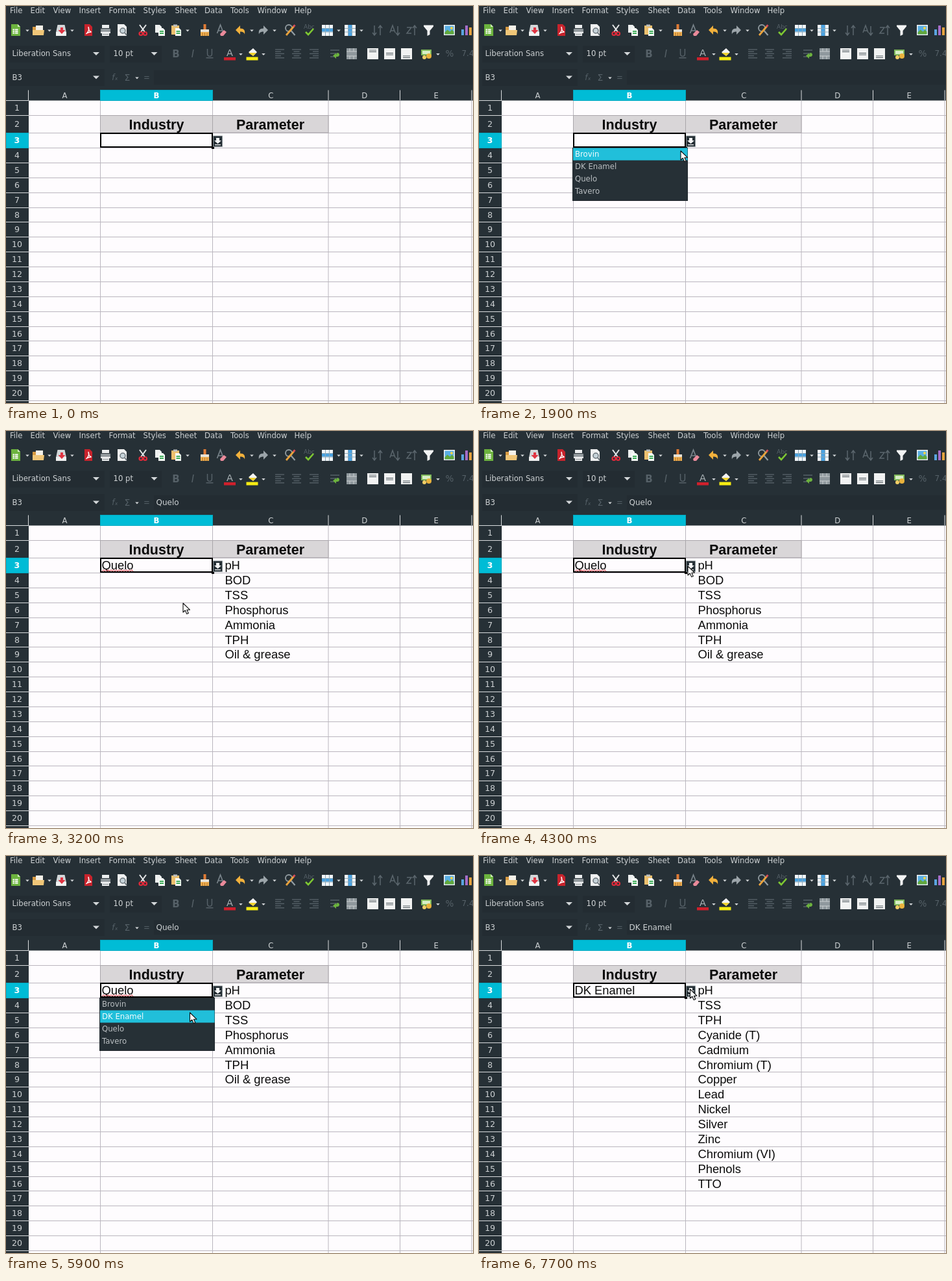
An HTML page that plays this animation: 720x611 px, repeating every 8 s.

```html
<!DOCTYPE html>
<html lang="en">
<head>
<meta charset="utf-8">
<title>Dependent drop-down list</title>
<style>
html, body { margin: 0; width: 100%; height: 100%; overflow: hidden; background: #263036; }
svg { display: block; width: 720px; height: 611px; }
text { font: 11.7px "DejaVu Sans", sans-serif; fill: #cdd1d3; white-space: pre; }
.mid { text-anchor: middle; }
.num { font-size: 12.6px; }
.on { fill: #fff; font-weight: bold; }
.dim { fill: #566168; }
.bar { font-size: 12px; }
.cell { font: 18.4px "Liberation Sans", Arial, sans-serif; fill: #0a0a0a; }
.head { font: bold 21.5px "Liberation Sans", Arial, sans-serif; fill: #0a0a0a; text-anchor: middle; }
.item { fill: #b9bec1; }
.item.hot { fill: #f2fbfd; }
</style>
</head>
<body>
<svg id="stage" viewBox="0 0 720 611">
  <rect width="720" height="611" fill="#263036"/>
  <g id="menu"></g>

  <!-- standard toolbar -->
  <g id="icons">
    <path d="M8 28h10l4 4v14H8z" fill="#6cb33e"/>
    <path d="M10 35h9v8h-9zM10 37.7h9M10 40.3h9M13.500 35v8" fill="#fff" stroke="#6cb33e" stroke-width=".8"/>
    <path d="M18 28v4h4z" fill="#d5efc2"/>
    <path d="M41 32h6l2 2h8v11H41z" fill="#d79a42"/>
    <path d="M46 30h11v7H46z" fill="#f4f1e8"/>
    <path d="M41 37h18l-1 8H41z" fill="#f0c678"/>
    <path d="M79.500 29h11l2.500 12H77z" fill="#d3d7d9"/>
    <path d="M77 40h16v6H77z" fill="#f1f2f2"/>
    <path d="M84 33h4v4h3.500l-5.500 6-5.500-6H84z" fill="#e03442"/>
    <path d="M121 28h8l4 4v14h-12z" fill="#c8232c"/>
    <path d="M123.500 43c4-3 5-8 3.500-11 0 5 2 7 4.500 8-3 0-6 1-8 3z" fill="none" stroke="#fff" stroke-width="1.300"/>
    <path d="M148 29h11v5h-11zM146 36h15v6h-15zM148 42h11v4h-11z" fill="#eceeef"/>
    <path d="M146 35h15v4h-15zM149 43.500h9" fill="#9ba2a6" stroke="#555e64" stroke-width=".7"/>
    <path d="M172 28h10l4 4v14h-14z" fill="#f0f1f1"/>
    <circle cx="180" cy="38" r="4" fill="#c7d3d9" stroke="#6a747a" stroke-width="1.500"/>
    <path d="M183 41l3 4" stroke="#6a747a" stroke-width="2"/>
    <path d="M206 29l8 11M216 29l-8 11" stroke="#e4e6e7" stroke-width="2"/>
    <g fill="none" stroke="#e02a3a" stroke-width="2.200"><circle cx="208" cy="42.500" r="2.500"/><circle cx="214.500" cy="42.500" r="2.500"/></g>
    <path d="M230 29h7l3 3v9h-10z" fill="#eef0f0"/>
    <path d="M235 34h7l3 3v9h-10z" fill="#f7f9f7"/>
    <path d="M237 39h6M237 42h6" stroke="#3fae5a" stroke-width="2"/>
    <path d="M255 30h12v14h-12z" fill="#edc06e"/>
    <path d="M258 28.500h6v3h-6z" fill="#b8bdc0"/>
    <path d="M261 34h6l3 3v9h-9z" fill="#f7f9f7"/>
    <path d="M262.500 39h6M262.500 42h6" stroke="#3fae5a" stroke-width="2"/>
    <path d="M304.500 28h4v8h-4z" fill="#e07b35"/>
    <path d="M300 36h13v4h-13z" fill="#e7e2d6"/>
    <path d="M300 40h13v6h-13z" fill="#efb052"/>
    <path d="M303 41v5M306.500 41v5M310 41v5" stroke="#b06f24"/>
    <path d="M325.500 42l5-13 5 13M327.500 38h6" fill="none" stroke="#78838a" stroke-width="1.700"/>
    <path d="M330 43l6-6 4 3-5 6h-4z" fill="#ea8a9a"/>
    <path d="M354 37l7-7v4.500c6 0 8 3 7 9-1-3-3-4-7-4v4.500z" fill="#f2b13c"/>
    <path d="M404 37l-7-7v4.500c-6 0-8 3-7 9 1-3 3-4 7-4v4.500z" fill="#9ca5aa"/>
    <circle cx="436" cy="34" r="5" fill="none" stroke="#929ca1" stroke-width="1.800"/>
    <path d="M439.500 38l6 7" stroke="#929ca1" stroke-width="2.200"/>
    <path d="M432 45l12-14" stroke="#e9a23b" stroke-width="2.800"/>
    <path d="M443 32l2.500-2.800" stroke="#d94c59" stroke-width="2.800"/>
    <text class="dim" x="459" y="35" style="font-size:9px">Abc</text>
    <path d="M462 40l4 4 8-9" fill="none" stroke="#7ec832" stroke-width="2.600"/>
    <g id="tables"></g>
    <g fill="none" stroke="#5b666d" stroke-width="1.500">
      <path d="M568 30v14M565 41l3 4 3-4M577 45V30M574 34l3-4 3 4"/>
      <path d="M592 41l4-11 4 11M593.500 38h5M604 31v13M601 41l3 4 3-4"/>
      <path d="M618 33h7l-7 9h7M630 45V30M627 34l3-4 3 4"/>
    </g>
    <path d="M644 29.500h15v2l-5.500 6.500v6l-4 2v-8l-5.500-6.500z" fill="#f3f4f4"/>
    <path d="M675 29h17v16h-17z" fill="#f4f4f4"/>
    <path d="M676.500 30.500h14v13h-14z" fill="#5aaee3"/>
    <path d="M676.500 43.500v-3l4-4 4 3 3-3 3 3v4z" fill="#61a83c"/>
    <circle cx="687" cy="34" r="2" fill="#f7d54a"/>
    <path d="M702 36h4v9h-4z" fill="#5aa4e0"/>
    <path d="M708 30h4v15h-4z" fill="#a56cc8"/>
    <path d="M714 33h4v12h-4z" fill="#e8a33d"/>
  </g>

  <!-- formatting toolbar -->
  <g fill="#232c32"><path d="M5 61h147v26H5zM160 61h80v26h-80zM5 97h147v26H5zM228 99h492v22H228z"/></g>
  <text x="9.500" y="77">Liberation Sans</text>
  <text x="165.500" y="77">10 pt</text>
  <text x="9.500" y="114">B3</text>
  <g class="mid">
    <text class="dim" x="262" y="79" style="font-size:15px;font-weight:bold">B</text>
    <text class="dim" x="288" y="79" style="font-size:15px;font-style:italic">I</text>
    <text class="dim" x="314" y="78" style="font-size:15px;text-decoration:underline">U</text>
    <text x="345" y="77" style="font-size:14.500px;fill:#aab2b6">A</text>
    <text class="dim" x="684" y="78" style="font-size:13.500px">%</text>
    <text class="dim" x="712" y="77" style="font-size:12px">7.4</text>
    <text class="dim" x="168" y="114" style="font-style:italic">fₓ</text>
    <text class="dim" x="187" y="115" style="font-size:14px">Σ</text>
    <text class="dim" x="217" y="114">=</text>
  </g>
  <path d="M336 79h18v4.500h-18z" fill="#d0202c"/>
  <path d="M370.500 78.500h18v5h-18z" fill="#f7ec13"/>
  <path d="M374 71l7-6 6 6-6 6z" fill="#f3f3f3"/>
  <path d="M374 72h12l-5 5z" fill="#f0d22e"/>
  <g id="aligns" stroke="#566168" stroke-width="1.400"></g>
  <path d="M500 68h14M500 73h11M500 78h6" stroke="#566168" stroke-width="1.500"/>
  <path d="M511 72c4 0 4 6 0 6h-2v3l-5-4.500 5-4v2.500" fill="#6cb33e"/>
  <path d="M525 65h16v17h-16z" fill="#8f989d"/>
  <path d="M525 70h16M525 77h16M530 65v5M536 65v5M530 77v5M536 77v5" stroke="#c9ced0"/>
  <g id="valigns"></g>
  <path d="M640 67h16v9h-16z" fill="#7fb95a"/>
  <path d="M642 69h12v5h-12z" fill="#d9efc8"/>
  <circle cx="652" cy="77" r="4" fill="#e9b23c"/><circle cx="645" cy="79" r="3" fill="#f2cf66"/>
  <g id="tris"></g>

  <!-- sheet -->
  <rect x="35" y="145.500" width="685" height="466" fill="#fefcfe"/>
  <g id="grid"></g>
  <g fill="#00bcd6" stroke="#00a9c1">
    <rect x="145.500" y="129.500" width="173" height="16"/>
    <rect x=".5" y="195.500" width="34" height="23"/>
  </g>
  <text class="mid on" x="232" y="141.500">B</text>
  <text class="mid num on" x="17" y="211.400">3</text>
  <rect x="145.500" y="168.500" width="351.500" height="26.500" fill="#d9d6d8" stroke="#a9a5aa"/>
  <path d="M318.500 168v27" stroke="#a9a5aa"/>
  <text class="head" x="232" y="189.500">Industry</text>
  <text class="head" x="407.500" y="189.500">Parameter</text>
  <g id="params"></g>
  <rect x="146" y="196" width="172" height="21" fill="#fefcfe" stroke="#000" stroke-width="2"/>
  <path d="M317 216h4v4h-4z" fill="#000"/>
  <text id="value" class="cell" x="147.400" y="213.200"></text>
  <path id="wave" fill="none" stroke="#e0303a" stroke-width="1"/>
  <text id="formula" class="bar" x="231.500" y="113.500"></text>
  <rect x="319.500" y="200" width="14" height="16.500" fill="#263036" stroke="#8b9498" stroke-width=".8"/>
  <path d="M324 203h5v4h3l-5.500 5-5.500-5h3zM322 213h9v1.300h-9z" fill="#f4f5f5"/>
  <g id="list">
    <rect x="144.500" y="218.500" width="177" height="81" fill="#263036" stroke="#1f272c"/>
    <rect id="hot" x="145" width="176.500" height="19" fill="#21bfda"/>
    <rect id="focus" x="147.500" y="220" width="173" height="16" fill="none" stroke="#7d878c" stroke-width=".8"/>
    <g id="items"></g>
  </g>
  <path id="mouse" d="M0 0v14l3.300-3 2.400 5.600 2.600-1.100-2.400-5.300h4.500z" fill="#fff" stroke="#0c0c0c" stroke-width="1.100" stroke-linejoin="round"/>
</svg>
<script>
const $ = id => document.getElementById(id);
const put = (id, html) => { $(id).innerHTML = html; };
const label = (x, y, s, cls = "") => `<text class="${cls}" x="${x}" y="${y}">${s}</text>`;
const line = (d, color) => `<path d="${d}" stroke="${color}" fill="none"/>`;

// toolbar parts
const menus = { File: 6, Edit: 37.5, View: 72.5, Insert: 112.5, Format: 158.5, Styles: 211.5,
  Sheet: 260.5, Data: 306, Tools: 346, Window: 387.5, Help: 444.5 };
put("menu", Object.entries(menus).map(([s, x]) => label(x, 11, s)).join(""));

const tri = (x, y, r) => `<path d="M${x - r} ${y - r / 2}h${2 * r}l${-r} ${r}z" fill="#d3d7d9"/>`;
put("tris",
  [33, 67, 102, 280, 379, 414, 513, 548].map(x => tri(x, 38, 2.8)).join("") +
  [362, 397, 666].map(x => tri(x, 74.5, 2.8)).join("") + tri(202, 111, 2.8) +
  tri(139, 73.5, 5) + tri(228.5, 73.5, 5) + tri(139, 110, 5));

put("tables", [487, 522].map((x, i) =>
  `<path d="M${x} 29h17v17h-17z" fill="#f3f6f8"/>` +
  `<path d="${i ? `M${x + 6} 29h5v17h-5z` : `M${x} 34.500h17v5h-17z`}" fill="#4aa3e2"/>` +
  line(`M${x} 34.500h17m-17 5.500h17M${x + 5.5} 29v17m6-17v17`, "#8aa7b8")).join(""));

put("aligns", [415, 441, 468].map((x, k) => [0, 1, 2, 3, 4].map(i => {
  const w = i % 2 ? 9 : 14;
  return `<path d="M${x + (14 - w) * k / 2} ${67 + i * 3.2}h${w}"/>`;
}).join("")).join(""));

put("valigns", [557, 583, 609].map((x, k) =>
  `<path d="M${x} 65h17v17h-17z" fill="#f1f2f2"/>` +
  line(`M${x + 3} ${68 + k * 4.5}h11m-11 2.500h11`, "#4d575d")).join(""));

// grid
const cols = [34.5, 145.5, 318.5, 497, 607.5, 718];
const bottom = n => n < 1 ? 145 : n < 2 ? 168 : n < 3 ? 195 : Math.round(218 + (n - 3) * 22.88);
let grid = "";
cols.forEach((x, i) => {
  if (i) grid += line(`M${x} 146V611`, "#bab6be");
  grid += line(`M${x} 129.500V145`, "#d9dcde");
  if (i < 5) grid += label((x + cols[i + 1]) / 2 + .5, 141.5, "ABCDE"[i], "mid");
});
for (let n = 0; n <= 20; n++) {
  const y = bottom(n) + .5;
  grid += line(`M0 ${y}H35`, "#d9dcde");
  if (n) grid += line(`M35 ${y}H720`, "#bab6be") +
    label(17, (y + bottom(n - 1)) / 2 + 4.6, n, "mid num");
}
put("grid", grid);

// list and its results
const names = ["Brovin", "DK Enamel", "Quelo", "Tavero"];
const results = {
  "": [],
  "Quelo": ["pH", "BOD", "TSS", "Phosphorus", "Ammonia", "TPH", "Oil &amp; grease"],
  "DK Enamel": ["pH", "TSS", "TPH", "Cyanide (T)", "Cadmium", "Chromium (T)", "Copper", "Lead",
    "Nickel", "Silver", "Zinc", "Chromium (VI)", "Phenols", "TTO"]
};
put("items", names.map((s, i) => label(148, 232 + i * 19, s, "item")).join(""));
$("wave").setAttribute("d", "M148 216" + "l2-2.500l2 2.500".repeat(12));

// pointer stops: time, x, y
const stops = [[0, 740, 500], [100, 718, 484], [900, 334, 210], [1100, 328, 203], [1400, 328, 203],
  [1900, 311, 223], [2400, 274, 258], [2500, 273, 259], [2900, 273, 265], [3500, 273, 265],
  [4200, 322, 208], [4600, 322, 208], [5000, 304.5, 227], [5100, 303.5, 228], [5400, 303, 229],
  [5800, 285, 240], [5900, 283.5, 241], [6700, 283.5, 243], [7500, 325.5, 205], [8000, 325.5, 205]];

function pointer(t) {
  const i = stops.findIndex(s => s[0] > t);
  const [t0, x0, y0] = stops[i - 1], [t1, x1, y1] = stops[i];
  const k = (t - t0) / (t1 - t0), e = k * k * (3 - 2 * k);
  return [x0 + (x1 - x0) * e, y0 + (y1 - y0) * e];
}

const fades = [[1200, 2900], [4500, 6000]];
function opacity(t) {
  for (const [a, b] of fades) {
    if (t >= a && t < b) return Math.min(1, .36 + (t - a) / 100 * .39);
    if (t === b) return .4;
  }
  return 0;
}

let chosen = null;
function choose(s) {
  if (s === chosen) return;
  chosen = s;
  $("value").textContent = $("formula").textContent = s;
  $("wave").style.display = s === "Quelo" ? "" : "none";
  put("params", results[s].map((p, i) => label(337.4, 213.2 + i * 22.88, p, "cell")).join(""));
}

function draw(now) {
  const t = Math.floor(now / 100) * 100 % 8000;
  const [x, y] = pointer(t), o = opacity(t);
  choose(t < 3000 ? "" : t < 6100 ? "Quelo" : "DK Enamel");
  $("mouse").setAttribute("transform", `translate(${x} ${y})`);
  $("mouse").style.display = t < 100 ? "none" : "";

  const list = $("list"), hot = Math.floor((y - 218) / 19);
  const over = hot >= 0 && hot < 4 && x < 322;
  list.style.opacity = o;
  list.setAttribute("transform", `translate(0 ${218 * (1 - o) * .12}) scale(1 ${1 - (1 - o) * .12})`);
  $("hot").setAttribute("y", 218.5 + hot * 19);
  $("hot").style.display = over ? "" : "none";
  $("focus").style.display = over ? "none" : "";
  [...$("items").children].forEach((el, i) => el.classList.toggle("hot", over && i === hot));
}

const start = performance.now();
function tick() {
  draw(performance.now() - start);
  requestAnimationFrame(tick);
}
draw(0);
requestAnimationFrame(tick);
</script>
</body>
</html>
```
